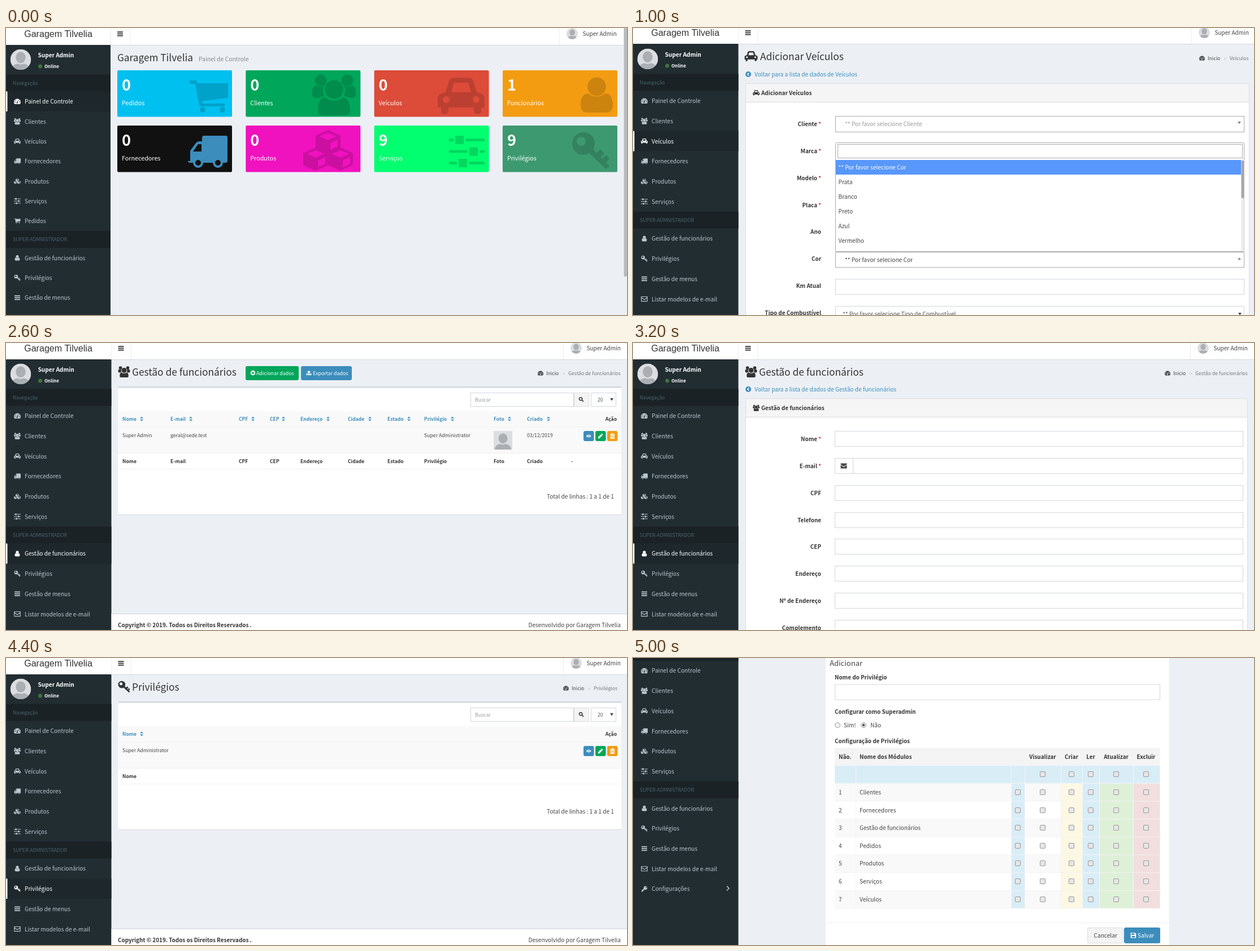
Recreate the animation shown at these times as an HTML page. Size 1099 by 509 pixels, loop 5800 ms.

```html
<!DOCTYPE html>
<html lang="pt">
<head>
<meta charset="utf-8">
<title>Painel</title>
<style>
html, body { margin: 0; width: 100%; height: 100%; overflow: hidden; background: #fff }
svg { display: block; width: 1099px; height: 509px }
text { font-family: "Noto Sans CJK JP", "Noto Sans CJK SC", "Noto Sans CJK KR", "Noto Sans CJK", "Open Sans", sans-serif; white-space: pre }
path { fill-rule: evenodd }
</style>
</head>
<body>
<script>
const BRAND = 'Garagem Tilvelia', MAIL = 'geral@sede.test';
const BLUE = '#3c8dbc', GREEN = '#00a65a', RED = '#dd4b39', ORANGE = '#f39c12', PAGE = '#ecf0f5', LINE = '#d2d6de';

// Basic shapes
const rect = (x, y, w, h, fill, stroke, r = 0) =>
  `<rect x="${x}" y="${y}" width="${w}" height="${h}" rx="${r}" fill="${fill}"${stroke ? ` stroke="${stroke}"` : ''}/>`;
const box = (x, y, w, h, fill = '#fff', stroke = LINE, r = 0) => rect(x + .5, y + .5, w - 1, h - 1, fill, stroke, r);
const dot = (x, y, r, fill = 'currentColor', more = '') => `<circle cx="${x}" cy="${y}" r="${r}" fill="${fill}" ${more}/>`;
const path = (d, more = '') => `<path d="${d}" ${more}/>`;
const ring = (x, y, r) => `M${x - r} ${y}a${r} ${r} 0 1 0 ${2 * r} 0a${r} ${r} 0 1 0 ${-2 * r} 0Z`;
const pen = w => `fill="none" stroke="currentColor" stroke-width="${w}"`;
// The Latin letters of this family are drawn 12% larger than nominal.
const text = (x, y, s, size = 11.35, fill = '#444', more = '') =>
  `<text x="${x}" y="${y}" font-size="${(size / 1.12).toFixed(2)}" fill="${fill}" ${more}>${s}</text>`;
const bold = (x, y, s, size, fill = '#333', more = '') => text(x, y, s, size, fill, 'font-weight="700" ' + more);
const END = 'text-anchor="end"', MID = 'text-anchor="middle"';

const cube = (x, y) => path('M-22-10L0-20L22-10V11L0 21L-22 11ZM-15-9L0-2L15-9L0-15ZM4 3V15L17 9V-3Z', `transform="translate(${x} ${y})"`);
const slide = (y, k) => path(`M0 ${y - 2.5}H${k - 3}V${y + 2.5}H0ZM${k} ${y - 7.5}h15v15h-15ZM${k + 18} ${y - 2.5}H63V${y + 2.5}H${k + 18}Z`);

// name: [width, height, markup]
const ICONS = {
  cart: [68, 57, path('M0 0H12L14 5H68V29Q68 31 65 31L22 37L23 41H62V46H18L16 41L10 6H0Z') + dot(23, 52, 5) + dot(58, 52, 5)],
  users: [77, 73, dot(38.5, 27, 16.5) + dot(15, 11, 10.5) + dot(62, 11, 10.5) +
    path('M10 65C10 50 14 41 23 41C31 49 46 49 54 41C63 41 67 50 67 65Q67 73 59 73H18Q10 73 10 65Z') +
    path('M0 32C0 25 2 20 7 20Q14 24 21 21C18 27 18 33 22 39C17 39 13 41 11 42H6Q0 41 0 36Z') +
    path('M77 32C77 25 75 20 70 20Q63 24 56 21C59 27 59 33 55 39C60 39 64 41 66 42H71Q77 41 77 36Z')],
  car: [83, 65, path('M14 26L20 6Q22 0 29 0H54Q61 0 63 6L69 26Q83 28 83 38V51Q83 53 81 53H77V58Q77 65 71 65Q64 65 64 58V53H19V58Q19 65 12 65Q6 65 6 58V53H2Q0 53 0 51V38Q0 28 14 26ZM24 26H59L55 11Q54 9 52 9H31Q29 9 28 11Z' + ring(15, 39, 6) + ring(68, 39, 6))],
  user: [57, 63, dot(28.5, 17, 16.5) + path('M0 50C0 38 4 29 13 29Q28 40 44 29C53 29 57 38 57 50Q57 63 45 63H12Q0 63 0 50Z')],
  truck: [70, 57, path('M25 10V4Q25 0 28 0H67Q70 0 70 3V44Q70 48 66 48H62A9 9 0 0 1 44 48H27A9 9 0 0 1 9 48H4Q0 48 0 45H4V28Q4 26 6 24L14 13Q17 10 19 10ZM9 28H24V15H18Z' + ring(18, 48, 5) + ring(53, 48, 5))],
  cubes: [88, 72, cube(44, 20) + cube(22, 51) + cube(66, 51)],
  sliders: [63, 58, slide(8.5, 11) + slide(29, 36) + slide(49.5, 17)],
  key: [66, 65, path(ring(20, 20, 20) + ring(16, 16, 8)) + path('M28 35L35 28L66 60L60 65Z') + path('M43 37L50 30L57 37L50 44ZM53 47L60 40L66 46L60 54Z')],
  dash: [20, 16, path('M0 10A10 10 0 0 1 20 10Q20 13 18 16H2Q0 13 0 10ZM9 10L11 5L12 5.3L11 10.5A2 2 0 1 1 9 10Z' + ring(3.5, 10, 1.3) + ring(5.5, 5.5, 1.3) + ring(14.8, 5.5, 1.3) + ring(16.5, 10, 1.3))],
  bars: [20, 17, [0, 6.5, 13].map(y => rect(0, y, 20, 3.6, 'currentColor')).join('')],
  mail: [20, 16, path('M1 1H19V15H1ZM1 4L10 10L19 4', pen(2))],
  envelope: [20, 16, path('M0 0H20V3L10 10L0 3ZM0 5L10 12L20 5V16H0Z')],
  wrench: [20, 20, path('M3 17L12 8', pen(4.6) + ' stroke-linecap="round"') + path('M18 2L14 6L15 8L19 4A6 6 0 1 1 15 1Z')],
  search: [20, 20, path(ring(8, 8, 6) + 'M12.5 12.5L19 19', pen(3.4))],
  down: [20, 18, path('M7 0H13V6H18L10 14L2 6H7Z') + path('M0 12H5L10 16L15 12H20V18H0Z')],
  up: [20, 18, path('M7 12H13V7H18L10 0L2 7H7Z') + path('M0 12H6V14H14V12H20V18H0Z')],
  plus: [20, 20, path(ring(10, 10, 10) + 'M8.5 4H11.5V8.5H16V11.5H11.5V16H8.5V11.5H4V8.5H8.5Z')],
  back: [20, 20, path(ring(10, 10, 10) + 'M11 4L13.5 6.5L10 10L13.5 13.5L11 16L5 10Z')],
  eye: [20, 13, path('M0 6.5Q10-6 20 6.5Q10 19 0 6.5Z' + ring(10, 6.5, 4.5)) + dot(10, 6.5, 2.6)],
  pencil: [20, 20, path('M0 20L1 14L11 4L16 9L6 19ZM12 3L15 0L20 5L17 8Z')],
  trash: [18, 20, path('M0 3H6V0H12V3H18V5H0ZM2 6H16V20H2ZM5 8V17H6.5V8ZM8.3 8V17H9.8V8ZM11.5 8V17H13V8Z')],
  power: [20, 20, path('M5.5 4A8 8 0 1 0 14.5 4M10 0V10', pen(3))],
  floppy: [20, 20, path('M0 0H16L20 4V20H0ZM3 2V8H14V2ZM4 12V18H16V12Z')]
};
const icon = (name, cx, cy, w, fill, opacity = 1) => {
  const [iw, ih, body] = ICONS[name], k = w / iw;
  return `<g transform="translate(${cx - w / 2} ${cy - ih * k / 2}) scale(${k})" fill="${fill}" color="${fill}" opacity="${opacity}">${body}</g>`;
};
const person = (x, y, w, clip = '') => `<g transform="translate(${x} ${y}) scale(${w / 40})" ${clip}>` +
  rect(0, 0, 40, 40, '#dcdde0') + '<g fill="#abafb3"><ellipse cx="20" cy="16" rx="9.5" ry="11"/><path d="M2 40Q3 30 14 28Q20 31 26 28Q37 30 38 40Z"/></g></g>';
const avatar = (cx, cy, r) => person(cx - r, cy - r, 2 * r, 'clip-path="url(#round)"');
const arrow = (x, y, s = 3, fill = '#444') => path(`M${x - s} ${y - s * .7}h${2 * s}l${-s} ${s * 1.5}Z`, `fill="${fill}"`);
const sorter = (x, y) => path(`M${x - 3} ${y - 1}l3-3l3 3ZM${x - 3} ${y + 1}l3 3l3-3Z`, `fill="${BLUE}"`);
const check = (x, y, on) => box(x - 5, y - 5, 10, 10, '#e6e6e6', '#999', 1.5) +
  (on ? path(`M${x - 2.8} ${y}l2 2.4l3.8-5`, 'fill="none" stroke="#333" stroke-width="1.7"') : '');

// Sidebar; top is the upper edge of the first item
const MENU = [['dash', 'Painel de Controle'], ['users', 'Clientes'], ['car', 'Veículos'], ['truck', 'Fornecedores'], ['cubes', 'Produtos'], ['sliders', 'Serviços']];
const ADMIN = [['user', 'Gestão de funcionários', 9], ['key', 'Privilégios', 11], ['bars', 'Gestão de menus', 10], ['mail', 'Listar modelos de e-mail', 11.5], ['wrench', 'Configurações', 11]];
function sidebar(top, pitch, active, menu = MENU, w = 186.5) {
  const size = w / 230 * 14, c = top - 56.5;
  let y = top - 30, out = rect(0, 0, w, 509, '#222d32');
  const item = ([ic, label, iw = 12]) => {
    const on = label === active, ink = on ? '#fff' : '#b8c7ce';
    if (on) out += rect(0, y, w, pitch, '#1e282c') + rect(0, y, 2.5, pitch, '#fff');
    out += icon(ic, 20, y + pitch / 2, iw, ink) + text(33, y + pitch / 2 + 4, label, size, ink);
    y += pitch;
  };
  const section = label => { out += rect(0, y, w, 30, '#1a2226') + text(12, y + 18.5, label, 9.7, '#4b646f'); y += 30; };
  section('Navegação');
  menu.forEach(item);
  section('SUPER-ADMNISTRADOR');
  ADMIN.forEach(item);
  return out + path(`M166 ${y - pitch / 2 - 5}l4 4l-4 4`, 'fill="none" stroke="#b8c7ce" stroke-width="1.5"') +
    avatar(26, c, 18.3) + bold(56.5, c - 4, 'Super Admin', size, '#fff') + dot(60.5, c + 12, 3.5, '#3c763d') + bold(68, c + 15, 'Online', 8.9, '#fff');
}
// Top bar; h is its height, ux the centre of the user picture
function topbar(h, ux, left = 186.5, ink = '#444') {
  const y = h - 20;
  return rect(0, 0, 1099, h, '#fff') + rect(left, h, 1099 - left, 1, LINE) +
    `<text x="92.5" y="${y + 5.5}" font-size="16.1" fill="#333" text-anchor="middle" style="font-family:'Liberation Sans',Arial,sans-serif">${BRAND}</text>` +
    rect(left, 0, 1, h, '#eee') + rect(left + 34, 0, 1, h, '#eee') + icon('bars', left + 17, y + .5, 10, '#333') +
    rect(ux - 23, 0, 1, h, '#eee') + avatar(ux, y, 10) + text(ux + 18.5, y + 4, 'Super Admin', 11.2, ink);
}
const shell = (h, ux, pitch, active, ink) => rect(0, 0, 1099, 509, PAGE) + sidebar(111.4, pitch, active) + topbar(h, ux, 186.5, ink);
const title = (ic, s, y, x = 224) => icon(ic, 209, y - 7, ic === 'car' ? 23 : 21, '#333') + text(x, y, s, 19.4, '#333');
const crumbs = (x, y, s) => icon('dash', x + 5, y - 3.5, 10, '#444') + text(x + 15, y, 'Inicio', 9.75) + text(x + 44, y, '&gt;', 9, '#bbb') + text(x + 54, y, s, 9.75, '#777');
const button = (x, y, w, h, fill, stroke) => box(x, y, w, h, fill, stroke || fill, 2);
const GREY = ['#f4f4f4', '#ddd'];

// Form panel with one label per row
const panel = (ic, s, top, right, labels) => box(199, top, right - 199, 450, '#fff', '#ddd', 2) + box(199, top, right - 199, 34, '#f5f5f5', '#ddd', 2) +
  icon(ic, 218, top + 17, 12, '#333') + bold(227, top + 21, s, 11.1) +
  labels.map((l, i) => {
    const must = l.endsWith('*'), y = top + 76 + i * 47.85;
    return bold(must ? 326 : 333, y, must ? l.slice(0, -1) : l, 11.1, '#333', END) + (must ? bold(333, y, '*', 11.1, '#b94a48', END) : '');
  }).join('');
const fields = (top, n, w) => Array.from({ length: n }, (_, i) => box(357, Math.round(top + 58 + i * 47.85), w, 28)).join('');

// List page
const footer = (right, y) => rect(186.5, y, 913, 509 - y, '#fff') + rect(186.5, y, 913, 1, LINE) +
  bold(198, y + 24, 'Copyright © 2019. Todos os Direitos Reservados .', 11.1) + text(right, y + 24, 'Desenvolvido por ' + BRAND, 11.35, '#444', END);
const cols = (list, y, fill, sort) => list.map(([x, s, sx]) => bold(x, y, s, 9.6, fill) + (sort ? sorter(sx, y - 3.5) : '')).join('');
const list = (right, bottom, columns, total, rowY, rowFill) =>
  rect(198.5, 77, right - 198.5, bottom - 77, '#fff', '', 2) + rect(198.5, 77, right - 198.5, 2.5, LINE, '', 1) + rect(199, bottom, right - 199, 1, '#d5d9de') +
  box(822, 88, 183, 25) + text(830, 104, 'Buscar', 9.75, '#999') + box(1005, 88, 27, 25, ...GREY) + icon('search', 1018, 100, 9, '#333') +
  box(1035, 88, 45, 25) + text(1047, 104, '20', 9.75, '#555') + arrow(1072, 100) +
  rect(199, 121, right - 199, 28, '#f9f9f9') + cols(columns, 138, BLUE, true) + bold(right - 8, 138, 'Ação', 9.6, '#333', END) +
  rect(199, 149, right - 199, rowY - 149, rowFill) + rect(199, 148.5, right - 199, 1, '#f0f0f0') + rect(199, rowY, right - 199, 1, '#f0f0f0') +
  cols(columns, rowY + 17.5, '#333') + rect(199, rowY + 28, right - 199, 1, '#f0f0f0') +
  text(right - 13, bottom - 28, total, 11.35, '#444', END);
const actions = [['eye', 1022, BLUE], ['pencil', 1043, GREEN], ['trash', 1064, ORANGE]]
  .map(([ic, x, c]) => button(x, 156, 18.5, 18, c) + icon(ic, x + 9.2, 165, 9, '#fff')).join('');
const tools = x => button(x, 41, 94, 25, GREEN) + icon('plus', x + 13, 53, 8.5, '#fff') + text(x + 19, 57, 'Adicionar dados', 9.9, '#fff') +
  button(x + 98, 41, 90, 25, BLUE) + icon('up', x + 112, 53, 9, '#fff') + text(x + 119, 57, 'Exportar dados', 9.9, '#fff');

function dashboard() {
  const tiles = [
    ['#00c0ef', 0, 'Pedidos', 'cart', 359, 121.5, 68], [GREEN, 0, 'Clientes', 'users', 580.5, 118.5, 77],
    [RED, 0, 'Veículos', 'car', 805.5, 120.5, 83], [ORANGE, 1, 'Funcionários', 'user', 1045.5, 118.5, 57],
    ['#111', 0, 'Fornecedores', 'truck', 357, 219.5, 70], ['#f012be', 0, 'Produtos', 'cubes', 570, 217, 88],
    ['#01ff70', 9, 'Serviços', 'sliders', 815.5, 219, 63], ['#3d9970', 9, 'Privilégios', 'key', 1035, 217.5, 66]];
  return rect(0, 0, 1099, 509, PAGE) + sidebar(112.5, 35.35, 'Painel de Controle', [...MENU, ['cart', 'Pedidos', 11]], 185) + topbar(30, 1002, 185) +
    text(197, 59, BRAND, 19.3, '#333') + text(341, 59, 'Painel de Controle', 11.6, '#888', 'font-weight="300"') +
    tiles.map(([c, n, s, ic, ix, iy, w], i) => {
      const x = 197 + i % 4 * 227.3, y = i < 4 ? 75 : 173;
      return rect(x, y, 203, 82.5, c, '', 2) + icon(ic, ix, iy, w, ic === 'truck' ? BLUE : '#000', ic === 'truck' ? 1 : .15) +
        bold(x + 8, y + 36, n, 30.5, '#fff') + text(x + 8, y + 62, s, 12.05, '#fff');
    }).join('') + rect(1093, 0, 6, 509, '#eceef0') + rect(1093.5, 0, 5.5, 441, '#b9babd', '', 2);
}

function addVehicle() {
  const colours = ['** Por favor selecione Cor', 'Prata', 'Branco', 'Preto', 'Azul', 'Vermelho'];
  return shell(28, 1011, 35.7, 'Veículos') + title('car', 'Adicionar Veículos', 57, 225) + crumbs(1002, 57, 'Veículos') +
    icon('back', 204, 82, 10, BLUE) + text(215, 86, 'Voltar para a lista de dados de Veículos', 11.35, BLUE) +
    panel('car', 'Adicionar Veículos', 98, 1091, ['Cliente*', 'Marca*', 'Modelo*', 'Placa*', 'Ano', 'Cor', 'Km Atual', 'Tipo de Combustível']) +
    box(358, 156, 724, 29, '#fff', '#aaa') + text(375, 174, '** Por favor selecione Cliente', 11.35, '#999') + arrow(1073, 168, 3, '#888') +
    box(358, 397, 724, 28, '#fff', '#aaa') + text(375, 415, '** Por favor selecione Cor') + path('M1070 411h6l-3-4Z', 'fill="#888"') +
    box(358, 445, 724, 28) + box(358, 493, 724, 28) + text(371, 511, '** Por favor selecione Tipo de Combustível', 11.35, '#555') + arrow(1074, 507) +
    box(358, 203, 724, 194, '#fff', '#aaa', 2) + box(362, 206, 717, 25, '#fff', '#aaa') + rect(359, 234, 717, 26, '#5897fb') +
    colours.map((s, i) => text(363.5, 251 + i * 26, s, 11.35, i ? '#444' : '#fff')).join('') +
    rect(1076, 234, 5.5, 162, '#eee') + rect(1076.5, 235, 5, 67, '#a8a8a8', '', 2);
}

function exportData() {
  const c = [[205, 'Cliente - Nome', 276], [824, 'Tipo de Combustível', 920], [973, 'Criado', 1010]];
  const ticks = [[319, 274, 'Cliente - Nome'], [407, 274, 'Cliente - CPF'], [485, 274, 'Marca'], [531, 274, 'Modelo'], [585, 274, 'Placa'],
    [629, 274, 'Ano'], [666, 274, 'Cor'], [701, 274, 'KM Atual'], [319, 291, 'Tipo de Combustível'], [434, 291, 'Criado']];
  const head = (y, s) => bold(319, y, s, 11.1);
  const input = (y, s, pick) => box(319, y, 460, 27.5) + text(pick ? 332 : 329, y + 17.5, s, 11.35, '#555') + (pick ? arrow(771, y + 13.5) : '');
  const help = (x, y, s) => text(x, y, s, 11.35, '#737373');
  return shell(29, 1006, 35.6, 'Veículos') + title('car', 'Veículos', 58) + crumbs(997, 57, 'Veículos') +
    list(1087, 284, c, 'Total de linhas : 0 a 0 de 0', 177, '#fcf8e3') + text(808, 103, 'Filtrar', 9.75, '#444', END) + bold(1045, 193.5, '-', 9.6) +
    footer(1085, 479) + rect(0, 0, 1099, 509, 'rgba(0,0,0,.65)') + rect(307, 12.5, 484, 497, '#fff') +
    icon('down', 325.5, 34.5, 13, '#333') + text(335, 40.5, 'Exportar dados', 14.6) + bold(774, 37, '×', 14, '#ccc', MID) + rect(307, 57, 484, 1, '#eee') +
    head(82, 'Nome do arquivo') + input(90, 'Report  - 03 Dec 2019') + help(319, 134, 'Você pode renomear o arquivo de acordo com sua vontade') +
    head(162, 'Dados máximos') + input(170, '100') + help(319, 214, 'Mínimo entre 1 e o máximo de 100,000 linhas por exportação') +
    head(242, 'Colunas') + ticks.map(([x, y, s]) => check(x + 5, y, true) + text(x + 16, y + 4, s)).join('') +
    head(323, 'Formato de exportação') + input(331, 'PDF', true) +
    box(319, 374, 9, 9, '#fff', BLUE, 1) + rect(321, 378, 5, 1, BLUE) + text(330, 383, 'Mostrar exportação avançada', 11.35, BLUE) +
    head(407, 'Tamanho da página') + input(415, 'Letter', true) + check(324, 455) + help(331, 460, 'Definir como tamanho de papel predifinido') +
    head(488, 'Orientação da página') + input(496, 'Retrait', true);
}

function staff() {
  const c = [[206, 'Nome', 240], [291, 'E-mail', 327], [412, 'CPF', 437], [467, 'CEP', 491], [521, 'Endereço', 570], [605, 'Cidade', 644],
    [675, 'Estado', 713], [740, 'Privilégio', 790], [863, 'Foto', 891], [922, 'Criado', 960]];
  return shell(29, 1009, 35.7, 'Gestão de funcionários') + title('users', 'Gestão de funcionários', 58, 223) + tools(424) + crumbs(941, 57, 'Gestão de funcionários') +
    list(1089, 304, c, 'Total de linhas : 1 a 1 de 1', 195, '#f9f9f9') +
    [[206, 'Super Admin'], [291, MAIL], [740, 'Super Administrator'], [922, '03/12/2019']].map(([x, s]) => text(x, 167, s, 9.75)).join('') +
    person(863, 156, 33) + actions + bold(1000, 212.5, '-', 9.6) + footer(1088, 480);
}

const PROFILE = ['Nome*', 'E-mail*', 'CPF', 'Telefone', 'CEP', 'Endereço', 'Nº de Endereço', 'Complemento'];
const mailBox = y => box(357, y, 33, 28) + icon('envelope', 373, y + 14, 11, '#444');
const addStaff = () => shell(29, 1009, 35.7, 'Gestão de funcionários') + title('users', 'Gestão de funcionários', 58, 223) + crumbs(941, 57, 'Gestão de funcionários') +
  icon('back', 204, 82, 10, BLUE) + text(215, 86, 'Voltar para a lista de dados de Gestão de funcionários', 11.35, BLUE) +
  panel('users', 'Gestão de funcionários', 98, 1088, PROFILE) + fields(98, 8, 723) + mailBox(204);

const profile = () => shell(29, 1009, 35.6, '', '#999') + title('users', 'Perfil', 58, 223) + panel('users', 'Perfil', 74, 1088, PROFILE) + fields(74, 8, 723) + mailBox(180) +
  text(367, 150, 'Super Admin', 11.35, '#555') + text(399, 198, MAIL, 11.35, '#555') +
  rect(874.5, 29.5, 225, 186, '#f9f9f9', '#ddd') + rect(875, 29, 224, 142, '#222') + avatar(987, 74, 34) + dot(987, 74, 35, 'none', 'stroke="#555" stroke-width="2.5"') +
  text(987, 133, 'Super Admin', 13.7, '#d0d0d0', MID) + text(987, 149, 'Super Administrator', 9.75, '#e0e0e0', MID) +
  text(987, 162.5, '03 December 2019', 9.5, '#e0e0e0', MID + ' font-style="italic"') +
  button(882, 179, 58, 28, ...GREY) + icon('user', 897.5, 193, 8.5, '#555') + text(904.5, 197, 'Perfil', 11.35, '#666') +
  button(1026, 179, 32, 28, ...GREY) + icon('key', 1042, 193, 10, '#555') + button(1061, 179, 31, 28, RED) + icon('power', 1076.5, 193, 10, '#fff');

const roles = () => shell(29, 1009, 35.7, 'Privilégios') + title('key', 'Privilégios', 58, 223) + crumbs(986, 57, 'Privilégios') +
  list(1089, 304, [[206, 'Nome', 240]], 'Total de linhas : 1 a 1 de 1', 195, '#f9f9f9') + text(206, 167, 'Super Administrator', 9.75) + actions + footer(1088, 480);

function addRole() {
  const modules = ['Clientes', 'Fornecedores', 'Gestão de funcionários', 'Pedidos', 'Produtos', 'Serviços', 'Veículos'];
  // left edge, width, fill, heading
  const bands = [[669, 24, '#d9edf7', ''], [693, 64, '', 'Visualizar'], [757, 38, '#fcf8e3', 'Criar'], [795, 30, '#d9edf7', 'Ler'], [825, 60, '#dff0d8', 'Atualizar'], [885, 47.5, '#f2dede', 'Excluir']];
  const radio = (x, on) => dot(x, 119, 4.5, '#f0f0f0', 'stroke="#999"') + (on ? dot(x, 119, 2.3, '#555') : '');
  let out = rect(0, 0, 1099, 509, PAGE) + sidebar(4.6, 35.7, '') + rect(341, 0, 608, 509, '#fff') + text(348, 14, 'Adicionar', 14.6) +
    bold(357, 38, 'Nome do Privilégio', 11.1) + box(357, 46.5, 576, 28) + bold(357, 99, 'Configurar como Superadmin', 11.1) +
    radio(362) + text(373, 123, 'Sim!') + radio(408, true) + text(420, 123, 'Não') + bold(357, 151, 'Configuração de Privilégios', 11.1) +
    rect(357, 159.5, 575.5, 31, '#f4f4f4') + rect(357, 190.5, 575.5, 32, '#d9edf7') + bold(364, 179, 'Não.', 11.1) + bold(401, 179, 'Nome dos Módulos', 11.1);
  modules.forEach((s, i) => {
    const y = 222.5 + i * 31.6;
    out += rect(357, y, 575.5, 31.6, i % 2 ? '#fff' : '#f9f9f9') + text(364, y + 19.5, i + 1) + text(401, y + 19.5, s);
  });
  for (const [x, w, fill, head] of bands) {
    const m = Math.round(x + w / 2 - .5);
    if (fill) out += rect(x, 222.5, w, 221.5, fill);
    if (head) out += bold(m, 179, head, 11.1, '#333', MID) + check(m, 206);
    modules.forEach((_, i) => out += check(m, Math.round(238 + i * 31.6)));
  }
  for (let i = 0; i < 9; i++) out += rect(357, 190 + i * 31.7, 575.5, 1, '#f4f4f4');
  for (const x of [394, ...bands.map(b => b[0])]) out += rect(x, 190, 1, 254, '#f4f4f4');
  return out + rect(341, 469, 608, 1, '#f0f0f0') + button(804, 478, 64, 28, ...GREY) + text(815.5, 496, 'Cancelar') +
    button(869, 478, 64, 28, BLUE) + icon('floppy', 885.5, 492, 9.5, '#fff') + text(893, 496, 'Salvar', 11.35, '#fff');
}

const SCENES = [[0, dashboard], [1000, addVehicle], [1800, exportData], [2600, staff], [3200, addStaff], [3800, profile], [4400, roles], [5000, addRole]];
const LOOP = 5800;
document.body.innerHTML = '<svg viewBox="0 0 1099 509"><defs><clipPath id="round"><circle cx="20" cy="20" r="20"/></clipPath></defs>' +
  SCENES.map(([, draw]) => `<g visibility="hidden">${draw()}</g>`).join('') + '</svg>';
const layers = document.querySelectorAll('svg > g');

function show() {
  const now = performance.now() % LOOP;
  const current = SCENES.findLastIndex(([start]) => now >= start);
  layers.forEach((g, i) => g.setAttribute('visibility', i === current ? 'visible' : 'hidden'));
  requestAnimationFrame(show);
}
show();
</script>
</body>
</html>
```
